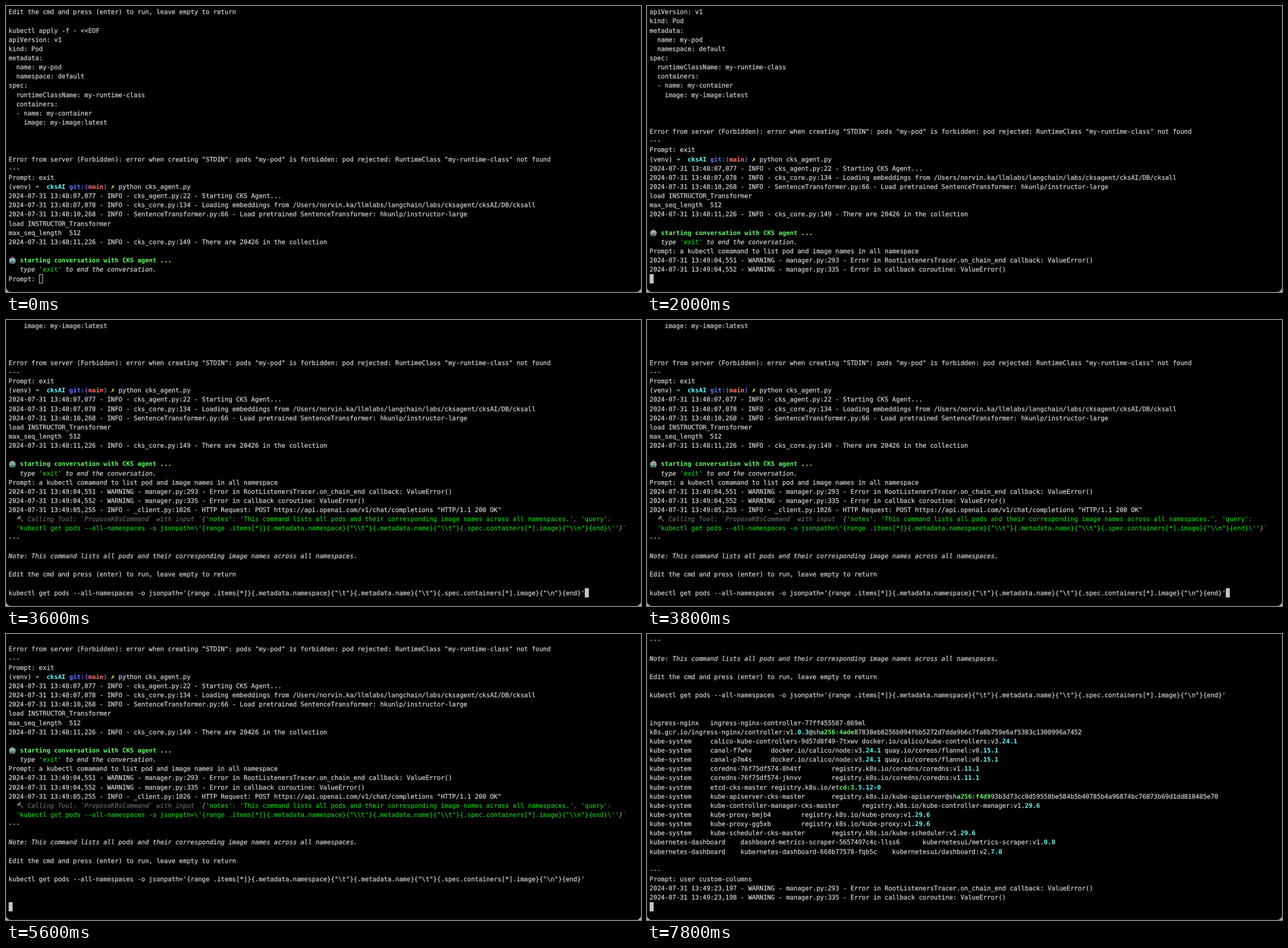
These frames come from a looping animation (1115 px wide and 502 px high, 8 s). An HTML page with a canvas:

```html
<!DOCTYPE html>
<html lang="en">
<head>
<meta charset="utf-8">
<title>Terminal session</title>
<style>
  html, body { margin: 0; width: 100%; height: 100%; overflow: hidden; background: #000; }
  canvas { display: block; }
</style>
</head>
<body>
<canvas id="stage" width="1115" height="502"></canvas>
<script>
const ctx = document.getElementById('stage').getContext('2d');
const LOOP = 8000, ROWS = 30;
const LEFT = 4.6, TOP = 2.4, CELL = 6.656, LINE = 16.15, BASELINE = 11.8;
const FOCUS_AT = 600;
const PLAIN = '#d2d2d2', CURSOR = '#c7c7c7';

// Markup: ~Xtext~ draws text in style X: [colour, font style].
const STYLES = {
  g: ['#5ffa68', 'bold'],
  y: ['#fffc67', 'bold'],
  c: ['#60fdff', 'bold'],
  b: ['#6871ff', 'bold'],
  r: ['#ff6e67', 'bold'],
  i: [PLAIN, 'italic'],
  d: ['#666', 'italic'],
  w: ['#858585', 'italic'],
  s: ['#14c414', '']
};

const command = String.raw`kubectl get pods --all-namespaces -o jsonpath='{range .items[*]}{.metadata.namespace}{"\t"}{.metadata.name}{"\t"}{.spec.containers[*].image}{"\n"}{end}'`;
const escaped = command.replace(/[\\']/g, '\\$&');
const note = 'This command lists all pods and their corresponding image names across all namespaces.';
const editHint = 'Edit the cmd and press (enter) to run, leave empty to return';

const callbackWarnings = (first, second) => `
2024-07-31 ${first} - WARNING - manager.py:293 - Error in RootListenersTracer.on_chain_end callback: ValueError()
2024-07-31 ${second} - WARNING - manager.py:335 - Error in callback coroutine: ValueError()
`;

const intro = `${editHint}

kubectl apply -f - <<EOF
apiVersion: v1
kind: Pod
metadata:
  name: my-pod
  namespace: default
spec:
  runtimeClassName: my-runtime-class
  containers:
  - name: my-container
    image: my-image:latest



Error from server (Forbidden): error when creating "STDIN": pods "my-pod" is forbidden: pod rejected: RuntimeClass "my-runtime-class" not found
---
Prompt: exit
(venv) ~g➜~  ~ccksAI~ ~bgit:(~~rmain~~b)~ ~y✗~ python cks_agent.py
2024-07-31 13:48:07,077 - INFO - cks_agent.py:22 - Starting CKS Agent...
2024-07-31 13:48:07,078 - INFO - cks_core.py:134 - Loading embeddings from /Users/norvin.ka/llmlabs/langchain/labs/cksagent/cksAI/DB/cksall
2024-07-31 13:48:10,268 - INFO - SentenceTransformer.py:66 - Load pretrained SentenceTransformer: hkunlp/instructor-large
load INSTRUCTOR_Transformer
max_seq_length  512
2024-07-31 13:48:11,226 - INFO - cks_core.py:149 - There are 20426 in the collection

🤖 ~gstarting conversation with CKS agent ~~y...~
   ~itype ~~s'exit'~~i to end the conversation.~
Prompt: `;

const toolCall = "  🔨 ~dCalling Tool: `ProposeK8sCommand` with input `~~w{~~s'notes'~~d: ~" +
  `~s'${note}'~~d, ~~s'query'~~d:~\n  ~s'${escaped}'~~w}~` + '~d`~' + `
---

~iNote: ${note}~

${editHint}

${command}`;

const system = (pod, image) => `kube-system\t${pod}\t${image}`;
const registry = (image, version) => `registry.k8s.io/${image}:v1.~c${version}~`;
const canal = id => system('canal-' + id,
  'docker.io/calico/node:v3.~c24.1~ quay.io/coreos/flannel:v0.~c15.1~');
const coredns = id => system('coredns-76f75df574-' + id, registry('coredns/coredns', '11.1'));
const proxy = id => system('kube-proxy-' + id, registry('kube-proxy', '29.6'));
const dashboard = (pod, image) => `kubernetes-dashboard\t${pod}\tkubernetesui/${image}`;

const podList = [
  'ingress-nginx\tingress-nginx-controller-77ff455587-869ml',
  'k8s.gcr.io/ingress-nginx/controller:v1.~c0.3~@sh~ga256:4ade~87838eb8256b094fbb5272d7dda9b6c7fa8b759e6af5383c1300996a7452',
  system('calico-kube-controllers-9d57d8f49-7txwv', 'docker.io/calico/kube-controllers:v3.~c24.1~'),
  canal('f7whv'),
  canal('p7m4s'),
  coredns('8h4tf'),
  coredns('jknvv'),
  system('etcd-cks-master', 'registry.k8s.io/et~gcd:3~.~c5.12-0~'),
  system('kube-apiserver-cks-master', 'registry.k8s.io/kube-apiserver@sh~ga256:f4d9~93b3d73cc0d59558be584b5b40785b4a96874bc76873b69d1dd818485e70'),
  system('kube-controller-manager-cks-master', registry('kube-controller-manager', '29.6')),
  proxy('bmjb4'),
  proxy('gg5xb'),
  system('kube-scheduler-cks-master', registry('kube-scheduler', '29.6')),
  dashboard('dashboard-metrics-scraper-5657497c4c-llss6', 'metrics-scraper:v1.~c0.8~'),
  dashboard('kubernetes-dashboard-668b77578-fqb5c', 'dashboard:v2.~c7.0~'),
  '', '---', 'Prompt: '
].join('\n');

// Terminal output by arrival time in ms.
const session = [
  [0, intro],
  [1800, 'a kubectl comamand to list pod and image names in all namespace'],
  [2000, callbackWarnings('13:49:04,551', '13:49:04,552')],
  [2400, '2024-07-31 13:49:05,255 - INFO - _client.py:1026 - HTTP Request: POST https://api.openai.com/v1/chat/completions "HTTP/1.1 200 OK"\n'],
  [3000, toolCall],
  [5000, '\n\n\n'],
  [5800, podList],
  [6800, 'user custom-columns'],
  [7400, callbackWarnings('13:49:23,197', '13:49:23,198')]
];

function box(color, x, y, w, h, r = 0) {
  ctx.fillStyle = color;
  ctx.beginPath();
  ctx.roundRect(x, y, w, h, r);
  ctx.fill();
}

function drawRobot(x, y) {
  box('#a8564c', x + 5.2, y + 1.4, 2.8, 2.8, 1.4);
  box('#a8564c', x + 0.4, y + 6.5, 2, 4, 1);
  box('#a8564c', x + 10.8, y + 6.5, 2, 4, 1);
  box('#6f959c', x + 1.4, y + 3.8, 10.4, 10, 3);
  box('#9dbbc1', x + 2.4, y + 4.2, 8.4, 2.2, 1.1);
  box('#d5e6e8', x + 3.1, y + 6.6, 2.6, 2.6, 1.3);
  box('#d5e6e8', x + 7.5, y + 6.6, 2.6, 2.6, 1.3);
  box('#20343a', x + 3.7, y + 7.2, 1.4, 1.4, 0.7);
  box('#20343a', x + 8.1, y + 7.2, 1.4, 1.4, 0.7);
  box('#2f444a', x + 3.6, y + 10.8, 6, 1.6, 0.8);
}

function drawHammer(x, y) {
  ctx.save();
  ctx.translate(x + 5.4, y + 5.8);
  ctx.rotate(-Math.PI / 4);
  box('#6b4a33', -0.9, 0, 1.9, 9.5, 0.8);
  box('#74797c', -4, -2.4, 7.6, 3.4, 0.8);
  ctx.restore();
}

const ICONS = { '🤖': drawRobot, '🔨': drawHammer };

// A hairline outline gives the regular weight its heavier smoothing.
function drawGlyph(char, x, y, heavier) {
  ctx.fillText(char, x, y);
  if (heavier) ctx.strokeText(char, x, y);
}

// Draws one marked-up row on the cell grid and returns its width in cells.
function drawRow(row, y) {
  let col = 0;
  row.split('~').forEach((part, index) => {
    const styled = index % 2 === 1;
    const [color, fontStyle] = styled ? STYLES[part[0]] : [PLAIN, ''];
    ctx.font = `${fontStyle} 11.05px "DejaVu Sans Mono", "DejaVu Sans", monospace`;
    ctx.textRendering = 'geometricPrecision';
    ctx.lineWidth = 0.25;
    for (const char of styled ? part.slice(1) : part) {
      const x = LEFT + col * CELL;
      if (char === '\t') {
        col += 8 - col % 8;
      } else if (ICONS[char]) {
        ICONS[char](x, y);
        col += 2;
      } else {
        ctx.fillStyle = ctx.strokeStyle = color;
        if (char !== ' ') drawGlyph(char, x, Math.round(y + BASELINE), fontStyle !== 'bold');
        col++;
      }
    }
  });
  return col;
}

function drawWindow() {
  ctx.fillStyle = '#b4b4b4';
  ctx.fillRect(0, 0, 1115, 502);
  box('#000', 0, -20, 1115, 522, 9);
  ctx.strokeStyle = '#2a2a2a';
  ctx.lineWidth = 1;
  ctx.stroke();
}

function drawCursor(col, y, focused) {
  const x = LEFT + col * CELL;
  if (focused) {
    box(CURSOR, x, y, CELL + 0.4, LINE);
  } else {
    ctx.strokeStyle = CURSOR;
    ctx.lineWidth = 1;
    ctx.strokeRect(Math.round(x) + 0.5, Math.round(y) + 0.5, 6, 15);
  }
}

function draw(time) {
  const output = session.filter(([at]) => at <= time).map(([, text]) => text).join('');
  const rows = output.split('\n').slice(-ROWS);
  drawWindow();
  let col = 0;
  rows.forEach((row, i) => { col = drawRow(row, TOP + i * LINE); });
  drawCursor(col, TOP + (rows.length - 1) * LINE, time >= FOCUS_AT);
}

const start = performance.now();
function tick() {
  draw((performance.now() - start) % LOOP);
  requestAnimationFrame(tick);
}
tick();
</script>
</body>
</html>
```
